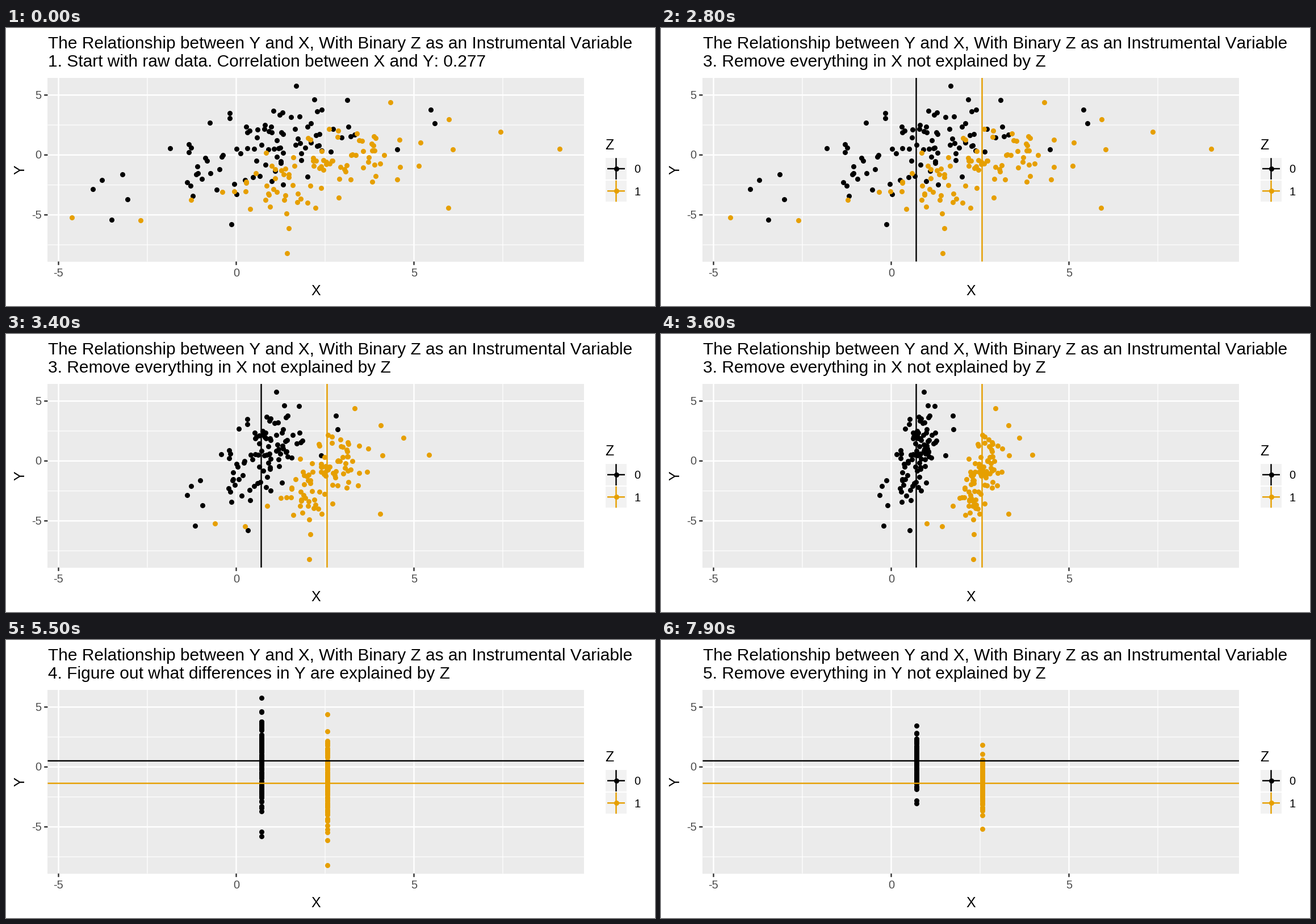
Recreate the animation shown at these times as a matplotlib script. Size 1143 by 490 pixels, loop 8000 ms.

```python
import numpy as np
import matplotlib.pyplot as plt
from matplotlib.animation import FuncAnimation
from matplotlib.patches import Rectangle

W, H, DPI = 1143, 490, 100
PX = 72 / DPI  # one pixel in points
BLACK, GOLD = "#000000", "#E69F00"
LEFT, RIGHT, TOP, BOTTOM = 73.4, 1018, 88, 411.6
THICK, THIN = 2.42, 1.21

plt.rcParams.update({"font.family": "Liberation Sans", "text.kerning_factor": 6})
fig = plt.figure(figsize=(W / DPI, H / DPI), dpi=DPI, facecolor="white")
ax = fig.add_axes([0, 0, 1, 1])
ax.set(xlim=(0, W), ylim=(H, 0))
ax.axis("off")


def px(v):
    return 405.5 + 62.6 * v


def py(v):
    return 223.8 - 21.12 * v


def line(xs, ys, color, width=THICK, z=1):
    return ax.plot(xs, ys, color=color, lw=width * PX, zorder=z,
                   solid_capstyle="butt", snap=False)[0]


def dots(xs, ys, color, z=3):
    return ax.plot(xs, ys, "o", color=color, ms=9 * PX, mew=0, zorder=z,
                   snap=False)[0]


def label(x, y, text, size, color="black", **kw):
    return ax.text(x, y, text, fontsize=size * PX, color=color,
                   va="baseline", **kw)


def box(x, y, w, h, color):
    ax.add_patch(Rectangle((x, y), w, h, fc=color, ec="none", zorder=0))


# Panel, grid and axes
box(LEFT, TOP, RIGHT - LEFT, BOTTOM - TOP, "#EBEBEB")
for v in (-2.5, 2.5, 7.5):
    line([px(v)] * 2, [TOP, BOTTOM], "white", THIN)
for v in (-7.5, -2.5, 2.5):
    line([LEFT, RIGHT], [py(v)] * 2, "white", THIN)
for v in (-5, 0, 5):
    x, y = px(v), py(v)
    line([x, x], [TOP, BOTTOM], "white")
    line([LEFT, RIGHT], [y, y], "white")
    line([x, x], [BOTTOM, BOTTOM + 6.2], "#333333")
    line([LEFT - 6.2, LEFT], [y, y], "#333333")
    label(x, 438, str(v), 20, "#4D4D4D", ha="center")
    label(62.5, y + 6.6, str(v), 20, "#4D4D4D", ha="right")
label(545.5, 471, "X", 25, ha="center")
label(32, 250, "Y", 25, ha="center", rotation=90, rotation_mode="anchor")

# Legend
label(1055, 214, "Z", 25)
for y, name, color in ((248, "0", BLACK), (287.3, "1", GOLD)):
    box(1056, y - 18.8, 37, 37.8, "#F2F2F2")
    line([1074.5] * 2, [y - 18.8, y + 19], color)
    line([1059, 1090], [y, y], color)
    dots([1074.5], [y], color)
    label(1106, y + 7.3, name, 20)

# Titles
label(73.5, 36, "The Relationship between Y and X, "
      "With Binary Z as an Instrumental Variable", 29.9)
subtitle = label(73.5, 68, "", 29.9)
STEPS = (
    (0, "1. Start with raw data. Correlation between X and Y: 0.277"),
    (5, "2. Figure out what differences in X are explained by Z"),
    (28, "3. Remove everything in X not explained by Z"),
    (51, "4. Figure out what differences in Y are explained by Z"),
    (74, "5. Remove everything in Y not explained by Z"),
)


def cloud(rng, center, spread, corr, n, extremes):
    """Correlated normal points cut off at two sigma, plus the extremes."""
    u = (np.arange(n) + rng.random(n)) / n
    r = np.sqrt(-2 * np.log(1 - 0.85 * u))
    a = rng.uniform(0, 2 * np.pi, n)
    x, e = r * np.cos(a), r * np.sin(a)
    y = corr * x + np.sqrt(1 - corr ** 2) * e
    core = center + np.column_stack([x, y]) * spread
    return np.vstack([core, extremes])


def ease(p):
    return (1 - np.cos(np.pi * np.clip(p, 0, 1))) / 2


class Group:
    def __init__(self, points, mean, color, z):
        self.points, self.mean = points, np.array(mean)
        self.dots = dots([], [], color, z)
        self.vline = line([mean[0]] * 2, [TOP, BOTTOM], color, z=6)
        self.hline = line([LEFT, RIGHT], [mean[1]] * 2, color, z=6)

    def show(self, i):
        done = np.array([ease((i - 27) / 13), ease((i - 73) / 13)])
        pos = self.points + (self.mean - self.points) * done
        self.dots.set_data(pos[:, 0], pos[:, 1])
        self.vline.set_visible(9 <= i < 51)
        self.hline.set_visible(i >= 55)


rng = np.random.default_rng(12)
black = cloud(rng, (455, 207), (95, 48), -0.45, 88, [
    (510.5, 102.5), (600.5, 127), (748, 144.5), (755, 168), (688.5, 214),
    (396.5, 346), (185.5, 338), (213.5, 301.5), (152.5, 284), (168.5, 267.5),
    (205, 257.5),
])
gold = cloud(rng, (555, 252), (95, 42), -0.45, 88, [
    (115.5, 334), (237, 339), (494.5, 396.5), (498, 353), (326, 303),
    (974.5, 213), (870.5, 183), (779.5, 161), (778.5, 317), (786.5, 213.5),
    (676.5, 131.5),
])
groups = (
    Group(black, (449.5, 213), BLACK, 4),
    Group(gold, (565.5, 252.6), GOLD, 5),
)


def update(i):
    subtitle.set_text([text for start, text in STEPS if i >= start][-1])
    for group in groups:
        group.show(i)
    return []


anim = FuncAnimation(fig, update, frames=80, interval=100, repeat=True,
                     repeat_delay=0, blit=False)
plt.show()
```
